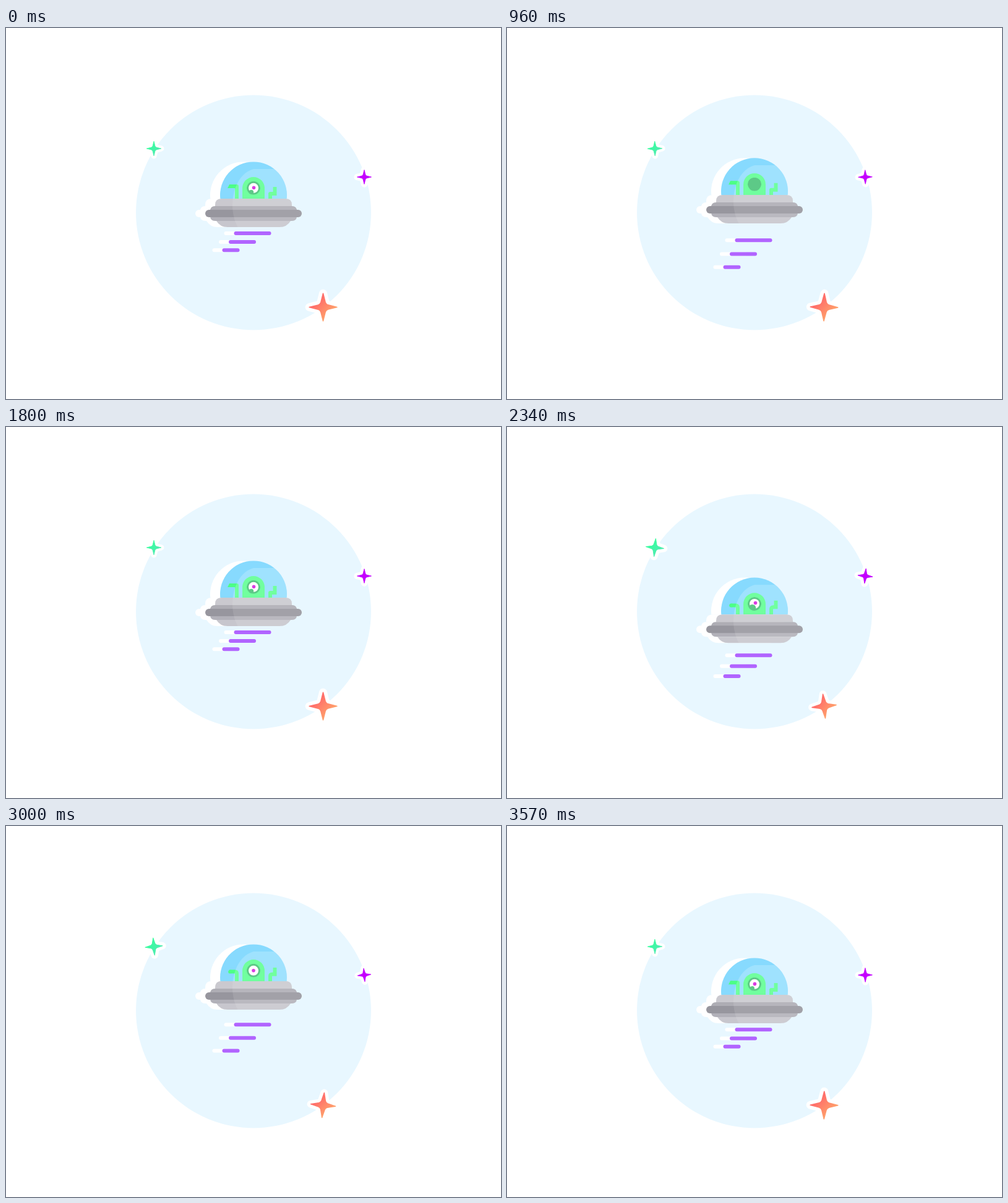
Write an HTML page that moves like this. It is 800x600 px and loops after 3600 ms.

```html
<!DOCTYPE html>
<html lang="en">
<head>
<meta charset="utf-8">
<title>Flying saucer</title>
<style>
  html, body { margin: 0; width: 100%; height: 100%; overflow: hidden; background: #fff; }
  svg { display: block; width: 800px; height: 600px; }
  .halo { fill: #fff; stroke: #fff; stroke-linejoin: round; }
  .limb { fill: none; stroke: #4cff86; stroke-width: 6; }
</style>
</head>
<body>
<svg viewBox="0 0 800 600">
  <defs>
    <path id="star" d="M0-22.3 L3.6-8 Q4.6-4.6 8-3.6 L22.3 0 L8 3.6 Q4.6 4.6 3.6 8 L0 22.3 L-3.6 8 Q-4.6 4.6-8 3.6 L-22.3 0 L-8-3.6 Q-4.6-4.6-3.6-8Z"/>
    <linearGradient id="coral" x1="0" y1="0" x2="1" y2="1">
      <stop offset=".3" stop-color="#ff6e69"/><stop offset=".75" stop-color="#ffa06b"/>
    </linearGradient>
    <linearGradient id="mint" x1="0" y1="0" x2="1" y2="1">
      <stop offset=".2" stop-color="#35ff9c"/><stop offset=".8" stop-color="#50eab2"/>
    </linearGradient>
    <path id="dome" d="M346.3-24 A54 54 0 1 1 453.7-24Z"/>
    <path id="top" d="M338-12 V-14 Q338-24 348-24 H452 Q462-24 462-14 V-12Z"/>
    <path id="upper" d="M330-4 Q330-12 338-12 H462 Q470-12 470-4Z"/>
    <path id="lower" d="M330 4 Q330 12 338 12 H462 Q470 12 470 4Z"/>
    <path id="base" d="M340 12 H460 Q454 22 442 22 H358 Q346 22 340 12Z"/>
    <rect id="band" x="322" y="-6" width="156" height="12" rx="6"/>
    <g id="hull">
      <use href="#top"/><use href="#upper"/><use href="#lower"/><use href="#base"/><use href="#band"/>
    </g>
    <path id="shine" d="M400-72 C378-66 366-40 366-14 C366 0 369 12 375 23 H480 V-72Z"/>
    <clipPath id="domeClip"><use href="#dome"/></clipPath>
    <clipPath id="hullClip">
      <use href="#top"/><use href="#upper"/><use href="#lower"/><use href="#base"/><use href="#band"/>
    </clipPath>
    <clipPath id="eyeClip"><circle r="11"/></clipPath>
  </defs>

  <circle cx="400" cy="298.5" r="190" fill="#e8f7ff"/>
  <g id="stars"></g>
  <g id="bars"></g>

  <g id="ship">
    <g fill="#fff" transform="translate(-16)"><use href="#dome"/><use href="#hull"/></g>
    <use href="#dome" fill="#87dafe"/>
    <g clip-path="url(#domeClip)">
      <path fill="#4cff86" d="M382-23 V-41 A18 18 0 0 1 418-41 V-23Z"/>
      <path id="armL" class="limb"/>
      <path id="hand" fill="#4cff86"/>
      <path id="armR" class="limb"/>
      <use href="#shine" fill="#fff" opacity=".2"/>
    </g>
    <g transform="translate(400 -41.3)" clip-path="url(#eyeClip)">
      <circle r="11" fill="#5dc987"/>
      <g id="eye">
        <circle r="8" fill="#fff"/>
        <circle id="lid" cx="-3.6" cy="6.8" fill="#5dc987"/>
        <circle id="pupil" r="2.8" fill="#d93ce2"/>
      </g>
    </g>
    <use href="#top" fill="#cac9cf"/>
    <use href="#upper" fill="#aeadb4"/>
    <use href="#lower" fill="#b2b1b9"/>
    <use href="#base" fill="#c7c6cd"/>
    <use href="#band" fill="#97969e"/>
    <use href="#shine" fill="#fff" opacity=".1" clip-path="url(#hullClip)"/>
  </g>
</svg>

<script>
const PERIOD = 1800;
const $ = id => document.getElementById(id);
const clamp = v => Math.max(0, Math.min(1, v));
const set = (el, name, value) => el.setAttribute(name, value);
const move = (el, value) => set(el, 'transform', value);

// scale = size + swing * sin² + lean * sin
const stars = [
  { x: 239, y: 195, fill: 'url(#mint)', size: .525, swing: .14, lean: 0, turn: 6, rim: 18 },
  { x: 579, y: 241, fill: '#c400ff', size: .515, swing: 0, lean: .03, turn: 6, rim: 20 },
  { x: 512.5, y: 451.5, fill: 'url(#coral)', size: 1, swing: -.13, lean: 0, turn: -6, rim: 13 }
];
// the gap below the ship runs from gap to gap + spread, lag in degrees
const bars = [
  { x: 368.5, w: 60, gap: 31.9, spread: 17.5, lag: 9.5 },
  { x: 360, w: 44, gap: 45.6, spread: 26, lag: 14 },
  { x: 349.5, w: 28, gap: 58.2, spread: 34.8, lag: 18 }
];

function addGroup(parent, html) {
  const g = document.createElementNS('http://www.w3.org/2000/svg', 'g');
  g.innerHTML = html;
  return $(parent).appendChild(g);
}

for (const s of stars) {
  s.el = addGroup('stars', `<use href="#star" class="halo" stroke-width="${s.rim}"/>
    <use href="#star" fill="${s.fill}" stroke="${s.fill}" stroke-width="1.6" stroke-linejoin="round"/>`);
}
for (const b of bars) {
  const rect = (x, fill) => `<rect x="${x}" y="-3" width="${b.w}" height="6" rx="3" fill="${fill}"/>`;
  b.el = addGroup('bars', rect(b.x - 16, '#fff') + rect(b.x, '#b164ff'));
}

function draw(now) {
  const t = now % PERIOD;
  const angle = t / PERIOD * 2 * Math.PI;
  const wave = Math.sin(angle);
  const pulse = wave * wave;
  const y = 300 + 28.7 * wave;

  move($('ship'), `translate(0 ${y})`);
  for (const b of bars) {
    const open = (1 - Math.cos(angle - b.lag * Math.PI / 180)) / 2;
    move(b.el, `translate(0 ${y + b.gap + b.spread * open})`);
  }
  for (const s of stars) {
    const k = s.size + s.swing * pulse + s.lean * wave;
    move(s.el, `translate(${s.x} ${s.y}) rotate(${s.turn * wave}) scale(${k})`);
  }

  const left = -44 + 5.8 * pulse;
  const bend = 4 * pulse;
  set($('armL'), 'd', `M373-23 V${left + bend} Q373 ${left} ${373 - bend} ${left} H363`);
  set($('hand'), 'd', `M364 ${left - 3} H361 Q${359.5 - 2.5 * pulse} ${left} ${358 + 3 * pulse} ${left + 3} H364Z`);

  const elbow = -32 - 4.5 * pulse;
  set($('armR'), 'd', `M427-23 V${elbow + bend} Q427 ${elbow} ${427 + bend} ${elbow} H434.5 V${-43 - 4 * pulse}`);

  const look = Math.max(0, .5 + 1.05 * wave);
  set($('pupil'), 'cx', look);
  set($('pupil'), 'cy', -look);
  set($('lid'), 'r', 5 * Math.max(0, .75 + .45 * wave - (wave < -.5 ? 1 : 0)));
  move($('eye'), `scale(1 ${clamp((Math.abs(t - 960) - 50) / 70)})`);
}

function tick() {
  draw(performance.now());
  requestAnimationFrame(tick);
}
tick();
</script>
</body>
</html>
```
